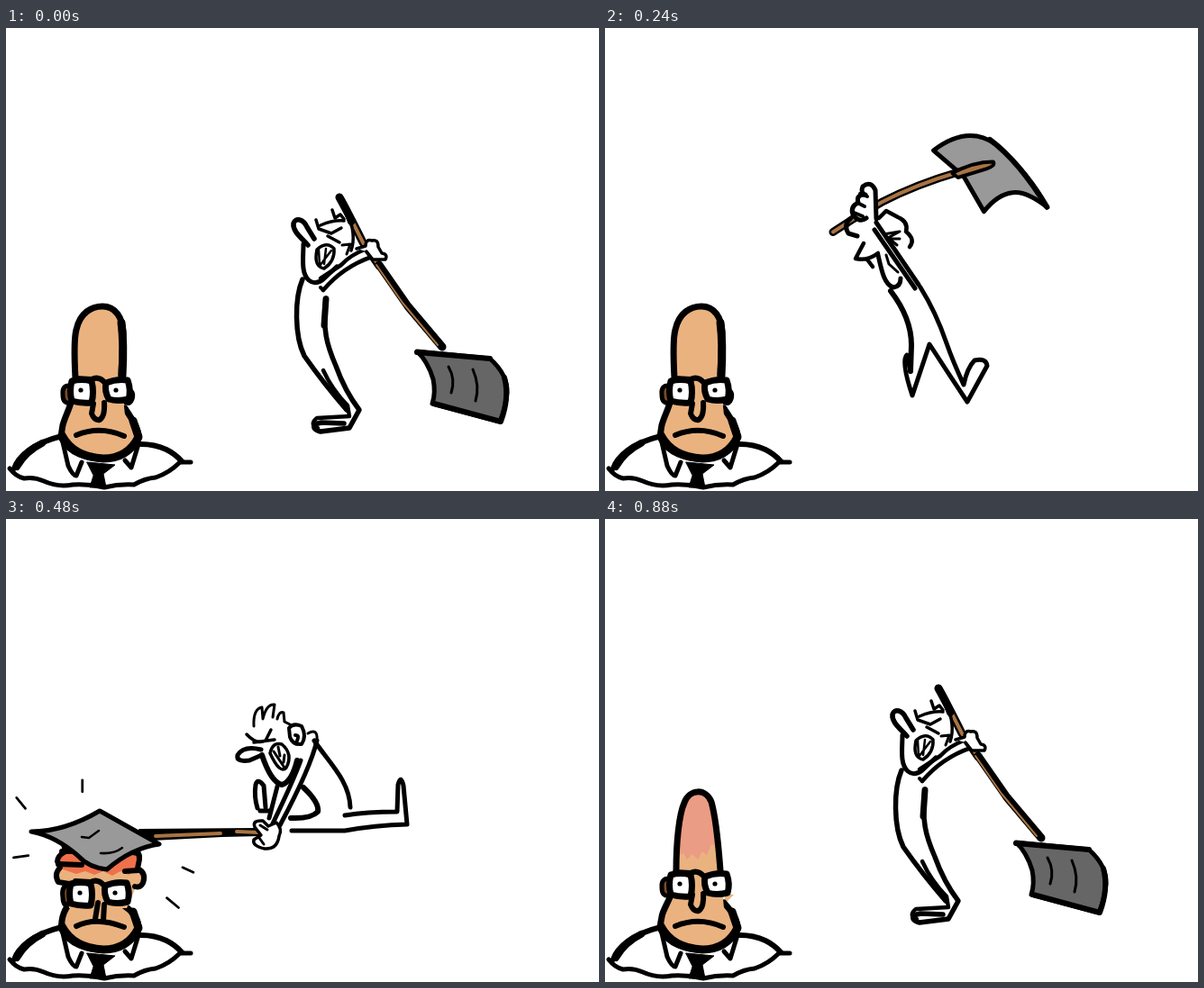
Write an HTML page with a canvas that moves like this. It is 658x514 px and loops after 0.96 s.

```html
<!DOCTYPE html>
<html lang="en">
<head>
<meta charset="utf-8">
<title>Shovel swing</title>
<style>
html, body { margin: 0; width: 100%; height: 100%; overflow: hidden; background: #fff; }
canvas { display: block; }
</style>
</head>
<body>
<canvas id="stage" width="658" height="514"></canvas>
<script>
const ctx = document.getElementById('stage').getContext('2d');
const SKIN = '#eab27f', STEEL = '#999', DARK_STEEL = '#666', WOOD = '#a87443', ORANGE = '#f0704a', EAR = '#7a4a28';
const STEP = 80, STEPS = 12;

function ink(d, width = 5, fill = null, color = '#000') {
  const path = new Path2D(d);
  if (fill) { ctx.fillStyle = fill; ctx.fill(path); }
  if (!width) return;
  ctx.lineWidth = width;
  ctx.strokeStyle = color;
  ctx.stroke(path);
}

function handle(d, width = 9, core = 4) {
  ink(d, width);
  ink(d, core, null, WOOD);
}

function dot(x, y, color) {
  ctx.fillStyle = color;
  ctx.beginPath();
  ctx.arc(x, y, 2.6, 0, 7);
  ctx.fill();
}

function turned(degrees, x, y, draw) {
  ctx.save();
  ctx.translate(x, y);
  ctx.rotate(degrees * Math.PI / 180);
  ctx.translate(-x, -y);
  draw();
  ctx.restore();
}

// The seated man

function shirt() {
  ink('M62 453Q38 459 25 469Q13 478 9 489', 6);
  ink('M40 461Q22 470 12 487', 8);
  ink('M4 489Q11 498 20 500Q31 498 42 503Q57 510 74 507Q92 506 109 510Q126 506 142 507Q154 500 166 499Q181 494 193 482L205 482', 5);
  ink('M150 462Q165 462 178 468Q188 473 195 481', 6);
  ink('M63 460L69 486Q74 497 78 497L84 482', 5);
  ink('M147 462L139 488L132 480', 5);
  ink('M90 482L121 485L108 495L111 510L93 510L97 497Z', 1, '#000');
}

function jaw(top) {
  ink(`M72 ${top}C68 430 60 440 62 456C70 472 90 478 108 478C128 478 140 469 147 456C148 445 140 435 132 ${top + 6}`, 7, SKIN);
  ink('M62 452C72 471 90 477 108 478C128 478 140 468 147 454L141 436', 9);
}

function glasses(dx, dy, pupil = '#000') {
  ctx.save();
  ctx.translate(dx, dy);
  ink('M73 392Q84 389 95 392Q98 404 95 416Q83 417 73 414Q70 403 73 392Z', 7, '#fff');
  ink('M111 394Q123 389 135 391Q139 402 136 412Q124 415 114 412Q109 403 111 394Z', 7, '#fff');
  ink('M78 389L95 390Q103 386 110 394', 6);
  dot(83, 402, pupil);
  dot(122, 402, pupil);
  ctx.restore();
}

function face(drop) {
  glasses(0, drop);
  ink('M97 417L95 428Q98 436 104 435Q110 431 109 416', 6);
  ink('M78 452Q104 441 131 453', 6);
}

function tallHead() {
  ink('M71 397Q62 396 63 407Q63 418 72 416', 5, EAR);
  ink('M134 402Q143 402 140 412Q138 418 133 416', 5, SKIN);
  jaw(416);
  ink('M77 420L77 390C76 370 75 346 78 335C82 316 95 309 107 309C122 309 129 322 130 337C130 355 128 370 128 390L132 430Z', 0, SKIN);
  ink('M77 389C76 370 75 346 78 335C82 316 95 309 107 309C122 309 129 322 130 337C130 355 128 370 128 388', 7);
  ink('M128 327Q131 350 129 386', 9);
  face(0);
}

function swollenHead(squash, tint) {
  ink('M71 399Q62 399 63 409Q63 420 72 418', 5, EAR);
  ink('M132 416L143 417L134 426Z', 0, SKIN);
  jaw(420);
  ctx.save();
  ctx.translate(0, 392 * (1 - squash));
  ctx.scale(1, squash);
  const skull = 'M79 390C79 360 82 328 88 315C94 299 112 299 118 314C124 335 126 365 128 390';
  ink(skull + 'L132 432L77 432Z', 0, SKIN);
  ink('M82 373C81 350 83 328 88 315C94 299 112 299 118 314Q124 338 125 364L118 361L113 373L108 369L103 378L97 372L91 378L87 371Z', 0, tint);
  ink(skull, 7);
  ctx.restore();
  face(3);
}

function crushedHead(pupil) {
  ink('M69 406Q61 408 63 420Q63 430 71 430', 5, EAR);
  jaw(424);
  ink('M68 406L57 402Q53 393 60 387L57 380Q57 374 66 369L64 361Q100 356 136 363Q149 367 148 378L146 388Q156 393 152 405L144 409L134 432L70 432Z', 0, SKIN);
  ink('M60 388L57 380Q57 374 66 369L64 361Q100 356 136 363Q149 367 148 378L146 388L136 395L127 391L118 396L108 391L98 395L88 391L78 394Z', 0, ORANGE);
  ink('M70 405L58 403Q53 394 60 387L57 380Q57 374 66 369L64 361Q100 357 136 362L138 366Q149 368 148 378L146 388Q156 393 152 404Q149 410 143 408', 6);
  ink('M62 369L79 369M58 383L84 384M130 368L146 371M132 391L147 390', 6);
  glasses(-1, 13, pupil);
  ink('M102 426L99 444M109 428L108 446', 6);
  ink('M78 452Q100 441 131 453', 6);
}

function impactLines(spread) {
  ctx.save();
  ctx.translate(100, 365);
  ctx.scale(spread, spread);
  ctx.translate(-100, -365);
  ink('M19 314L28 325M86 296L86 308M16 375L31 373M188 385L199 390M172 416L184 426', 2.5);
  ctx.restore();
}

// The worker with the shovel

function resting() {
  handle('M370 188Q379 204 396 238L414 264', 9, 4);
  ink('M370 188Q378 200 383 215', 8);
  ink('M414 263L446 309L484 354', 9);
  ink('M411 263L440 305L479 352', 2, null, WOOD);
  ink('M456 359L537 367Q557 385 556 405Q555 420 548 437L473 417Q477 405 474 390Q468 370 456 359Z', 5, DARK_STEEL);
  ink('M456 360L537 367M553 388Q559 410 549 437L475 417', 6);
  ink('M491 376Q499 390 494 405M518 379Q526 397 521 414', 3);

  ink('M335 241C328 233 318 226 319 217C321 210 330 212 334 221L342 234', 5.5);
  ink('M330 240C330 255 327 272 336 280Q343 286 352 279L367 265', 5);
  ink('M345 246Q356 236 364 245Q365 259 353 267Q341 265 345 246Z', 3.5);
  ink('M347 246L348 264L361 247M355 245L353 262', 2.5);
  ink('M344 213L347 223L361 228L372 222M349 219Q363 213 375 214M357 231L370 238', 3.5);
  ink('M362 202L365 211L371 207L375 212M379 205Q389 230 383 247', 3.5);
  ink('M373 241L382 240L378 251', 3);
  ink('M349 278L372 263Q382 252 398 246M352 291Q374 265 406 254', 4.5);
  ink('M389 245L399 242Q399 234 406 236Q413 234 413 243L417 250Q424 251 421 257L407 257L400 248', 3.5, '#fff');
  ink('M329 279C320 300 320 342 331 364Q352 394 378 424', 5.5);
  ink('M355 300C351 335 356 352 366 375Q376 403 392 424L381 444L349 448Q340 446 342 440L350 438L375 439', 5.5);
  ink('M355 301L353 330', 7);
  ink('M352 380Q362 402 379 419L381 431L345 433Q336 440 346 444', 4.5);
  ink('M352 291L349 288', 4);
}

function flatShovel() {
  ink('M454 208C475 198 495 197 510 205C540 225 570 250 592 273L580 265L520 265L476 229Q455 220 454 208Z', 5, STEEL);
  ink('M567 264L581 264L592 273', 6);
  handle('M270 187L306 189Q327 195 357 199C385 200 400 214 420 217L470 228');
  handle('M474 230Q510 231 533 240');
}

function lifting(tilt) {
  ink('M306 187Q310 179 322 181L326 189', 5, '#fff');
  turned(tilt, 340, 195, flatShovel);
  ink('M327 207Q326 196 330 190Q331 183 337 183L339 190Q342 181 347 190L357 188Q358 202 344 211Q332 215 327 207Z', 4, '#fff');
  ink('M338 187L339 194M347 186L347 194', 3);
  ink('M331 211L332 250L334 292M340 212C339 245 343 270 349 290', 5);
  ink('M325 210Q306 210 298 202M305 211L287 208L300 214L287 216Q294 225 303 224L294 229', 4);
  ink('M301 203Q317 214 326 211M297 231Q316 224 328 232L310 236', 4);
  ink('M308 236Q288 234 284 243Q285 252 298 249L316 247', 5);
  ink('M311 249C307 266 308 280 313 285Q323 289 328 276', 6);
  ink('M330 238L319 249L328 271M322 249L327 244', 3.5);
  ink('M344 233Q354 230 352 243Q350 250 343 247', 4.5);
  ink('M320 287C325 330 341 374 363 421', 5);
  ink('M349 290C355 325 386 373 386 430Q386 447 381 459Q374 464 366 460Q363 456 368 447Q379 432 375 410C370 390 360 376 353 359', 5);
  ink('M363 421L335 416Q327 420 334 423L370 429', 5);
}

function raisedShovel() {
  ink('M310 102Q322 56 360 54Q410 57 448 74Q418 74 408 85Q396 97 396 121L354 104Z', 5, STEEL);
  ink('M352 54Q392 53 448 74', 6);
  handle('M278 242L287 216L300 183C315 150 335 120 348 102');
  ink('M342 109Q353 84 370 71Q375 73 369 82Q360 95 350 109Z', 4, WOOD);
}

function leaping(tilt) {
  turned(tilt, 288, 198, raisedShovel);
  ink('M301 212L300 180Q295 169 286 176Q283 183 289 185Q278 185 281 194Q272 198 275 207Q282 217 290 211', 5, '#fff');
  ink('M283 184L291 187M280 194L288 198M274 204L286 209', 4);
  ink('M273 211Q264 218 270 228L280 231', 5);
  ink('M301 216L348 285M299 224L344 289', 5);
  ink('M304 211L312 203L325 210Q337 215 334 226Q345 235 338 243', 4.5);
  ink('M309 229L327 226L312 234L327 234M318 236L324 241', 3);
  ink('M287 239L278 256Q291 259 303 250M291 257L297 265', 4.5);
  ink('M303 252C307 270 310 285 320 288Q328 287 328 278', 5);
  ink('M312 252L315 262L325 271', 3);
  ink('M317 292Q340 322 340 352L339 381', 6);
  ink('M339 381L335 363Q328 369 341 408L360 351Q380 382 402 415L424 375Q423 366 410 369Q402 377 398 396Q386 370 379 350Q367 315 350 288', 5);
}

function striking() {
  ink('M148 345L278 344L284 351L240 352L162 356Z', 2, '#000');
  ink('M166 352L238 349M256 347L281 348', 4, null, WOOD);
  ink('M28 347Q65 347 104 324L170 361Q140 365 112 389Q92 387 80 374Q55 352 28 347Z', 5, STEEL);
  ink('M84 353L92 354L103 346M105 371Q120 372 129 365', 2.5);

  ink('M275 230Q274 211 284 209L285 222Q289 205 298 206L296 220M301 222Q303 213 308 215L309 225L315 228', 3);
  ink('M267 239Q278 251 288 246L294 234M275 248L298 245', 3.5);
  ink('M283 256Q264 251 257 262Q255 270 270 268L284 262', 5);
  ink('M284 262Q294 292 306 295Q317 292 323 268', 6);
  ink('M293 260Q296 247 306 250Q319 261 311 276Q304 284 293 260Z', 3.5);
  ink('M297 258L309 276M302 253L304 263M309 262L308 270', 3);
  ink('M314 232Q319 226 328 230Q334 241 328 250Q318 251 315 242ZM321 240Q326 240 323 246', 4);
  ink('M335 238Q346 232 345 245', 3);
  ink('M345 246Q338 276 304 340M327 268Q320 288 296 338M301 297L292 332', 5);
  ink('M342 246C358 270 381 290 382 320', 5);
  ink('M330 298Q348 315 346 325Q338 333 316 332', 6);
  ink('M288 320L286 296Q279 287 277 295Q275 308 279 321M282 324L293 324', 5);
  ink('M376 329Q400 325 434 325L435 295Q438 283 441 296L445 339Q409 340 376 346L317 346', 5);
  ink('M276 342Q273 334 285 335L291 341L300 337Q307 344 303 352Q301 367 287 366Q273 363 275 356L283 351Z', 3.5, '#fff');
  ink('M282 340L290 345M281 354L286 361', 3);
}

function render(step) {
  ctx.fillStyle = '#fff';
  ctx.fillRect(0, 0, 658, 514);
  ctx.lineCap = ctx.lineJoin = 'round';
  shirt();

  if (step < 5) tallHead();
  else if (step < 10) crushedHead(step === 9 ? '#22f' : '#000');
  else if (step === 10) swollenHead(0.8, '#ee8262');
  else swollenHead(1, '#eb9c84');

  if (step === 0 || step > 8) resting();
  else if (step < 3) lifting(step === 1 ? 22 : 0);
  else if (step < 5) leaping(step === 3 ? 38 : 0);
  else striking();

  if (step > 4 && step < 8) impactLines(1 + (step - 5) * 0.09);
}

let shown = -1;
function tick() {
  const step = Math.floor(performance.now() / STEP) % STEPS;
  if (step !== shown) render(shown = step);
  requestAnimationFrame(tick);
}
tick();
</script>
</body>
</html>
```
